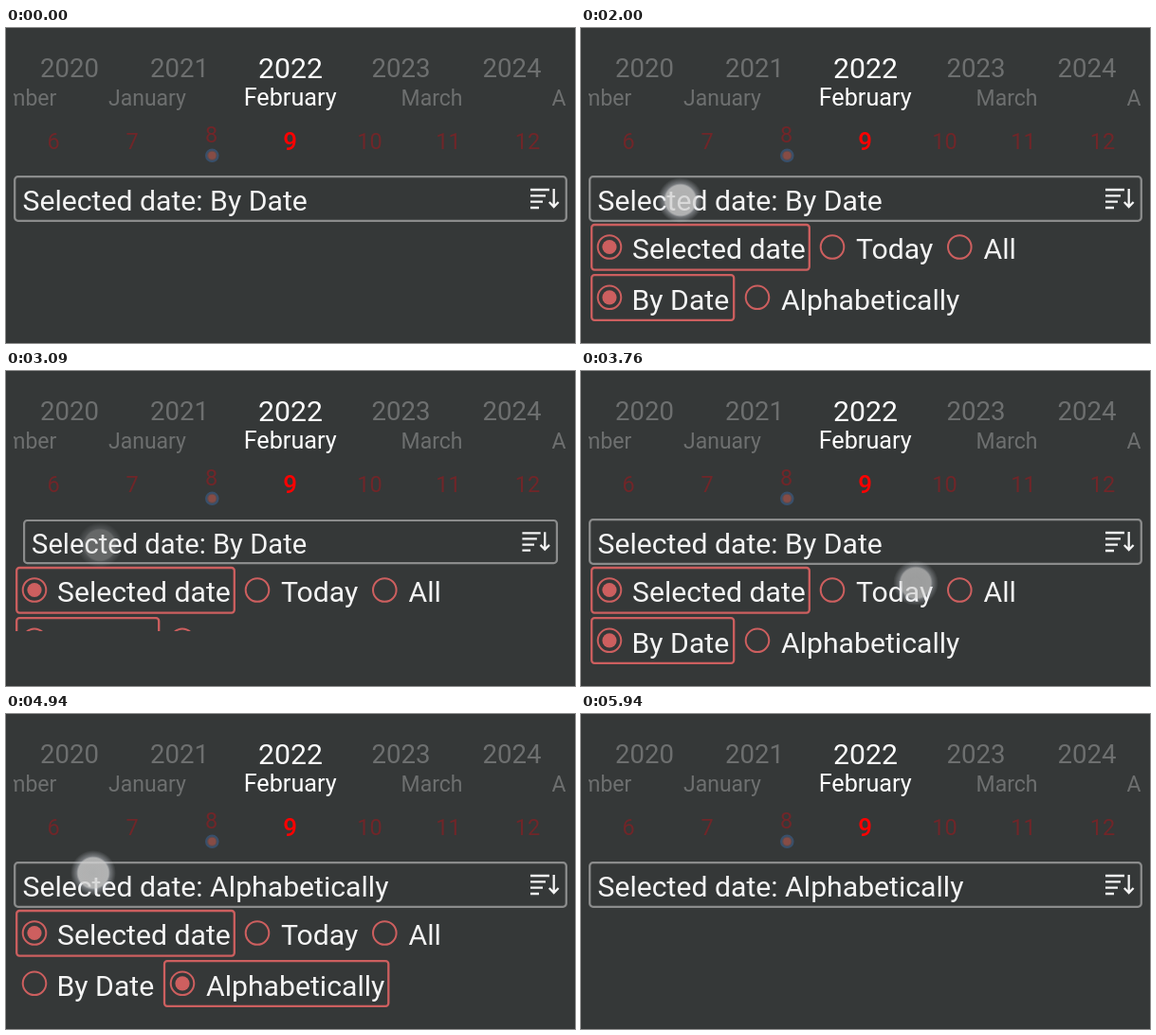
Animation, 600 px wide and 333 px high, one loop 6.18 s. Source, as an HTML page:

```html
<!DOCTYPE html>
<html lang="en">
<head>
<meta charset="utf-8">
<title>Date list sorting</title>
<style>
  html, body { margin: 0; width: 100%; height: 100%; overflow: hidden; background: #353838; }
  svg { position: absolute; left: 0; top: 0; width: 600px; height: 333px; }
  text { font-family: Roboto, "Noto Sans", sans-serif; fill: #f4f4f4; }
  .mid text, text.mid { text-anchor: middle; }
  .years text { font-size: 27.6px; fill: #6d6f6f; }
  .months text { font-size: 23px; fill: #6d6f6f; }
  .days text { font-size: 23.5px; fill: #702629; }
  .years .now { font-size: 30.2px; fill: #fff; }
  .months .now { font-size: 25.2px; fill: #fff; }
  .days .now { font-size: 26px; font-weight: 500; fill: #f00; }
  .label { font-size: 30.2px; }
  .line { fill: none; stroke-width: 2.3; }
  .grey { stroke: #8b8c8c; }
  .red { stroke: #cd5f5f; }
  .fill { fill: #cd5f5f; }
  .icon { stroke: #f4f4f4; }

  .bar, .options, .pointer, .before, .after { animation: 6.18s linear infinite; }
  .bar { transform-origin: 300px 181px; animation-name: press; }
  .options { animation-name: unfold; animation-timing-function: ease-out; }
  .pointer { animation-name: touch; }
  .before { animation-name: before; animation-timing-function: step-end; }
  .after { animation-name: after; animation-timing-function: step-end; }

  @keyframes press {
    0%, 24.3%, 30.4%, 35.6%, 41.7%, 47.9%, 54.9%, 81.6%, 87.9%, 100% { transform: scale(1); }
    25.9%, 27.5%, 37.2%, 38.8%, 49.5%, 51.5%, 83.2%, 85% { transform: scale(.966); }
  }
  @keyframes unfold {
    0%, 25.6%, 41.6%, 47.7%, 86.7%, 100% { clip-path: inset(0 0 128px 0); }
    30.7%, 36.4%, 52.6%, 81.9% { clip-path: inset(0 0 21px 0); }
  }
  @keyframes before {
    0% { visibility: visible; }
    70.4%, 100% { visibility: hidden; }
  }
  @keyframes after {
    0% { visibility: hidden; }
    70.4%, 100% { visibility: visible; }
  }
  @keyframes touch {
    0%, 15.5% { transform: translate(108px, 166px); opacity: 0; }
    18.1% { transform: translate(108px, 164px); opacity: .8; }
    19.4% { transform: translate(108px, 162px); opacity: 1; }
    23.3% { transform: translate(108px, 155px); opacity: 1; }
    25.2% { transform: translate(107px, 160px); opacity: 1; }
    27.8% { transform: translate(106px, 166px); opacity: 0; }
    29.1% { transform: translate(106px, 180px); opacity: 0; }
    31.4% { transform: translate(105px, 182px); opacity: 1; }
    36.4% { transform: translate(104px, 182px); opacity: 1; }
    39.6% { transform: translate(103px, 182px); opacity: 0; }
    43.7% { transform: translate(100px, 184px); opacity: 0; }
    45.6% { transform: translate(99px, 184px); opacity: 1; }
    48.7% { transform: translate(99px, 184px); opacity: 1; }
    50% { transform: translate(99px, 184px); opacity: .4; }
    51% { transform: translate(99px, 184px); opacity: 0; }
    57.6% { transform: translate(352px, 218px); opacity: 0; }
    60.84% { transform: translate(353px, 224px); opacity: .85; }
    64.1% { transform: translate(352px, 238px); opacity: 1; }
    66% { transform: translate(338px, 255px); opacity: 0; }
    67% { transform: translate(310px, 288px); opacity: 0; }
    68.9% { transform: translate(306px, 291px); opacity: 1; }
    70.9% { transform: translate(301px, 295px); opacity: 1; }
    73.5% { transform: translate(300px, 297px); opacity: 0; }
    76.1% { transform: translate(93px, 168px); opacity: 0; }
    78.3% { transform: translate(92px, 168px); opacity: 1; }
    80% { transform: translate(92px, 168px); opacity: 1; }
    82.5% { transform: translate(91px, 172px); opacity: 1; }
    85.4%, 100% { transform: translate(91px, 174px); opacity: 0; }
  }
</style>
</head>
<body>
<svg viewBox="0 0 600 333">
  <defs>
    <clipPath id="strip"><rect x="8" width="584" height="150"/></clipPath>
  </defs>
  <g class="mid" clip-path="url(#strip)">
    <g class="years">
      <text x="67" y="52">2020</text>
      <text x="183" y="52">2021</text>
      <text class="now" x="300" y="53">2022</text>
      <text x="416.5" y="52">2023</text>
      <text x="533.5" y="52">2024</text>
    </g>
    <g class="months">
      <text x="1" y="81.5">December</text>
      <text x="149" y="81.5">January</text>
      <text class="now" x="299.7" y="82">February</text>
      <text x="449" y="81.5">March</text>
      <text x="599" y="81.5">April</text>
    </g>
    <g class="days">
      <text x="50" y="128">6</text>
      <text x="133" y="128">7</text>
      <text x="216.5" y="121">8</text>
      <text class="now" x="299.7" y="129">9</text>
      <text x="383.5" y="128">10</text>
      <text x="466.5" y="128">11</text>
      <text x="550" y="128">12</text>
    </g>
    <circle cx="217.3" cy="134.8" r="6.3" fill="#5c4c50" stroke="#38506c" stroke-width="2"/>
    <circle cx="217.3" cy="134.8" r="4" fill="#874c45"/>
  </g>
  <g class="bar">
    <rect class="line grey" x="9.2" y="157.2" width="581.6" height="46.6" rx="3.5"/>
    <text class="label before" x="17.5" y="193.3">Selected date: By Date</text>
    <text class="label after" x="17.5" y="193.3">Selected date: Alphabetically</text>
    <path class="line icon" d="M553 171h20M553 177.3h16M553 183.7h13M553 190h9M577.7 170v18.5M572.8 184l4.9 5 4.9-5"/>
  </g>
</svg>

<svg class="options" viewBox="0 0 600 333">
  <rect class="line red" x="11.2" y="208" width="229.6" height="47.6" rx="3"/>
  <rect class="line red before" x="11.2" y="261.2" width="150" height="47.6" rx="3"/>
  <rect class="line red after" x="167" y="261.2" width="236.3" height="47.6" rx="3"/>
  <g class="line red" style="stroke-width: 2">
    <circle cx="30" cy="231.5" r="12.3"/>
    <circle cx="265" cy="231.5" r="12.3"/>
    <circle cx="399.3" cy="231.5" r="12.3"/>
    <circle cx="30" cy="284.8" r="12.3"/>
    <circle cx="186" cy="284.8" r="12.3"/>
  </g>
  <circle class="fill" cx="30" cy="231.5" r="7.6"/>
  <circle class="fill before" cx="30" cy="284.8" r="7.6"/>
  <circle class="fill after" cx="186" cy="284.8" r="7.6"/>
  <g class="label">
    <text x="54" y="244.3">Selected date</text>
    <text x="290" y="244.3">Today</text>
    <text x="424.5" y="244.3">All</text>
    <text x="53.5" y="297.6">By Date</text>
    <text x="211" y="297.6">Alphabetically</text>
  </g>
</svg>

<svg viewBox="0 0 600 333">
  <defs>
    <radialGradient id="glow">
      <stop offset="0" stop-color="#d2d2d2" stop-opacity=".78"/>
      <stop offset=".66" stop-color="#d2d2d2" stop-opacity=".8"/>
      <stop offset=".74" stop-color="#e4e8f0" stop-opacity=".36"/>
      <stop offset="1" stop-color="#e4e8f0" stop-opacity="0"/>
    </radialGradient>
  </defs>
  <circle class="pointer" r="24" fill="url(#glow)"/>
</svg>
</body>
</html>
```
